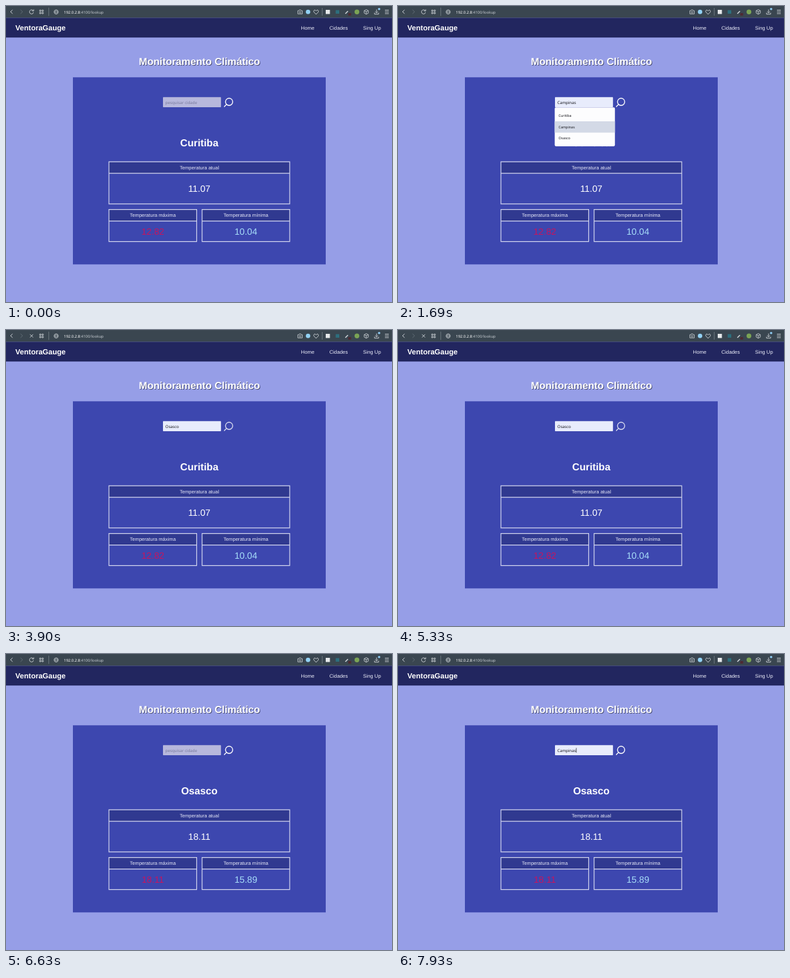
Write an HTML page that moves like this. It is 600 px wide and 462 px high and loops after 8000 ms.

```html
<!DOCTYPE html>
<html lang="pt">
<head>
<meta charset="utf-8">
<title>Monitoramento Climático</title>
<style>
  html, body { margin: 0; width: 100%; height: 100%; overflow: hidden; background: #969ee7; }
  svg { display: block; width: 100%; height: 100%; }
  text { font-family: "Liberation Sans", Arial, sans-serif; fill: #fff; text-rendering: geometricPrecision; }
  .ui { font-family: "Noto Sans", sans-serif; }
  .mid { text-anchor: middle; }
  .bold { font-weight: 700; font-size: 15.7px; }
  .nav { font-size: 7.8px; fill: #eceefa; }
  .label { font-size: 7.6px; fill: #e6e8f8; }
  .value { font-size: 14.2px; }
  .field { font-size: 6.2px; }
  .item { font-size: 5.4px; fill: #16161c; }
  .line { fill: none; stroke: #d5dade; stroke-width: .9; }
  .card { fill: none; stroke: #d3d6ef; stroke-width: 1.2; }
  .head { fill: #303990; }
</style>
</head>
<body>
<svg viewBox="0 0 600 462">
  <rect width="600" height="462" fill="#969ee7"/>

  <!-- browser bar -->
  <rect width="600" height="18.5" fill="#3a4650"/>
  <g class="line">
    <path d="M10.3 6 7 9l3.300 3"/>
    <path d="M22.500 6 25.800 9l-3.300 3" stroke="#65717a"/>
    <path id="reload" d="M42.300 7.300A3.200 3.200 0 1 0 42.800 10M43 5.300v2.500h-2.500"/>
    <path id="stop" d="M37.300 6.800l4.800 4.800M42.100 6.800l-4.800 4.800"/>
    <path d="M52.300 6.300h2v2h-2zM56 6.300h2v2h-2zM52.300 10h2v2h-2zM56 10h2v2h-2z" stroke-width=".8"/>
    <path d="M66.500 2.500v13M491.500 3v12" stroke="#7d8890" stroke-width=".7"/>
    <circle cx="78" cy="9.300" r="3.300" stroke-width=".7"/>
    <path d="M74.700 9.300h6.600M78 6c-2.200 2-2.200 4.600 0 6.600 2.200-2 2.200-4.600 0-6.600" stroke-width=".6"/>
    <path d="M453.700 7.300h1.500l.8-1.200h2.200l.8 1.200h1.500v5h-6.800z" stroke-width=".8"/>
    <circle cx="457.100" cy="9.700" r="1.300" stroke-width=".7"/>
    <path d="M482 12.700c-5-3.200-4-6.400-2-6.400 1.200 0 2 1.400 2 1.400s.8-1.400 2-1.400c2 0 3 3.200-2 6.400z"/>
    <path d="M527.500 12l4-4" stroke-width="1.400"/>
    <path d="M560 5.600l3.200 1.700v3.800l-3.200 1.800-3.200-1.800V7.300zM556.800 7.300l3.200 1.700 3.200-1.700M560 9v3.900" stroke-width=".8"/>
    <path d="M576 5.500v5M573.900 8.700l2.100 2.100 2.100-2.100M572.800 10.500v2.200h6.400v-2.200"/>
    <path d="M589 6.500h6M589 9.200h6M589 11.900h6"/>
  </g>
  <circle cx="469.500" cy="9.200" r="3.400" fill="#92d1f4"/>
  <rect x="497" y="6" width="6.500" height="6.500" fill="#e6e9eb"/>
  <rect x="512.500" y="6.500" width="5.500" height="5.500" fill="#2d6f7e"/>
  <rect x="532" y="11" width="4.500" height="4" fill="#4d2a32"/>
  <circle cx="545.500" cy="9.200" r="3.700" fill="#7ba455"/>
  <circle cx="580" cy="4.800" r="1.800" fill="#8fcdf5"/>
  <text class="ui" x="90" y="11.500" font-size="5.950">192.0.2.8<tspan fill="#c3c9ce">:4100/lookup</tspan></text>

  <!-- site header -->
  <rect y="18.500" width="600" height="30.700" fill="#22265f"/>
  <text x="14.500" y="38" font-size="11.550" font-weight="700">VentoraGauge</text>
  <text class="nav" x="458.500" y="37">Home</text>
  <text class="nav" x="502.700" y="37">Cidades</text>
  <text class="nav" x="555" y="37">Sing Up</text>
  <g id="loader">
    <rect id="bar" y="18.200" height="1.500" fill="#5058d6"/>
    <path id="spin" d="M587.200 33.800A4 4 0 1 1 592.800 28.200" transform="rotate(0)" fill="none" stroke="#5058d6" stroke-width="1.200"/>
  </g>

  <text class="bold mid" x="301.600" y="92.900" style="fill:#4b4f78">Monitoramento Climático</text>
  <text class="bold mid" x="300.700" y="92">Monitoramento Climático</text>

  <!-- panel -->
  <rect x="104" y="111.300" width="393" height="292" fill="#3d47af"/>
  <rect id="field" x="244" y="142.300" width="90.200" height="15.700" rx=".8"/>
  <text id="query" class="ui field" x="247.800" y="152.600"></text>
  <path id="caret" stroke="#16161c" stroke-width=".7"/>
  <g id="lens" fill="none" stroke="#fff" stroke-width="1.350" stroke-linecap="round">
    <circle cx="346.800" cy="149.600" r="5.600"/>
    <path d="M342.700 153.600l-3.300 3.400"/>
  </g>
  <text id="city" class="bold mid" x="300.500" y="219.300"></text>

  <g id="cards"></g>

  <g id="list">
    <rect x="243.600" y="158.300" width="93.600" height="60.600" rx="1.800" fill="#fdfdfe"/>
    <rect id="hover" x="243.600" width="93.600" height="17.600" fill="#d3d9e6"/>
    <text class="ui item" x="249.600" y="172.900"></text>
    <text class="ui item" x="249.600" y="190.500"></text>
    <text class="ui item" x="249.600" y="208.100"></text>
  </g>
</svg>
<script>
const LOOP = 8000, STEP = 130;
const $ = id => document.getElementById(id);
const set = (id, attrs) => {
  for (const k in attrs) $(id).setAttribute(k, attrs[k]);
};
const show = (id, on) => set(id, { visibility: on ? 'visible' : 'hidden' });
const ramp = (t, a, b) => Math.min(1, Math.max(0, (t - a) / (b - a)));

const card = (id, x, y, w, h, label, color) => {
  const mid = x + w / 2;
  return `<rect class="head" x="${x}" y="${y}" width="${w}" height="18"/>
    <path class="card" d="M${x} ${y}h${w}v${h}h${-w}zM${x} ${y + 18}h${w}"/>
    <text class="label mid" x="${mid}" y="${y + 11.8}">${label}</text>
    <text id="${id}" class="value mid" x="${mid}" y="${y + 18 + (h - 18) / 2 + 5}" style="fill:${color}"></text>`;
};
$('cards').innerHTML =
  card('now', 160, 243.2, 281, 65.600, 'Temperatura atual', '#fff') +
  card('max', 160, 317.6, 136.400, 50, 'Temperatura máxima', '#c5155f') +
  card('min', 304.800, 317.6, 136.200, 50, 'Temperatura mínima', '#a6dcf8');

const before = { city: 'Curitiba', now: '11.07', max: '12.82', min: '10.04' };
const after = { city: 'Osasco', now: '18.11', max: '18.11', min: '15.89' };

// Each search: focus, list fade-in, hover per row, choice
const searches = [
  { items: ['Curitiba', 'Campinas', 'Osasco'], focus: 1040, open: 1300, hover: [1430, 1560, 1820], pick: 1950, end: 5720 },
  { items: ['Curitiba', 'Osasco', 'Campinas'], focus: 6630, open: 7020, hover: [7410, 7540, 7670], pick: 7930, end: LOOP }
];
const rows = document.querySelectorAll('.item');

function drawSearch(t) {
  const s = searches.find(s => t >= s.focus && t < s.end);
  let text = '', row = -1, fade = 0, caret = false;
  if (s) {
    row = s.hover.filter(h => t >= h).length - 1;
    text = s.items[row] || '';
    if (t < s.pick) {
      fade = ramp(t, s.focus, s.open);
      s.items.forEach((name, i) => rows[i].textContent = name);
    } else {
      caret = t < s.pick + 500;
    }
  }
  $('query').textContent = text || 'pesquisar cidade';
  $('query').style.fill = text ? '#16161c' : '#77799c';
  set('field', { fill: text ? '#e8ecfc' : '#b7b8dc' });
  set('list', { opacity: fade });
  show('list', fade > 0);
  show('hover', fade > 0 && row >= 0);
  set('hover', { y: 162.4 + 17.600 * Math.max(0, row) });
  show('caret', caret);
  if (caret) set('caret', { d: `M${248.3 + $('query').getComputedTextLength()} 146.600v7.400` });
}

function drawPage(t) {
  const data = t < 5720 ? before : after;
  for (const k in data) $(k).textContent = data[k];

  const waiting = t >= 2600 && t < 5720;
  show('stop', waiting);
  show('reload', !waiting);
  set('lens', { opacity: t < 5720 ? 1 - .2 * ramp(t, 2210, 2600) : 1 });

  const loading = t >= 5720 && t < 6500;
  show('loader', loading);
  const part = t < 6370 ? .08 + .362 * ramp(t, 5720, 6240) : 1;
  set('bar', { width: 600 * part });
  set('spin', { transform: `rotate(${(t - 6240) * .9 + 20} 590 31)` });
}

function draw(t) {
  drawPage(t);
  drawSearch(t);
}

const start = performance.now();
function tick() {
  const t = (performance.now() - start) % LOOP;
  draw(Math.floor(t / STEP) * STEP);
  requestAnimationFrame(tick);
}
tick();
</script>
</body>
</html>
```
